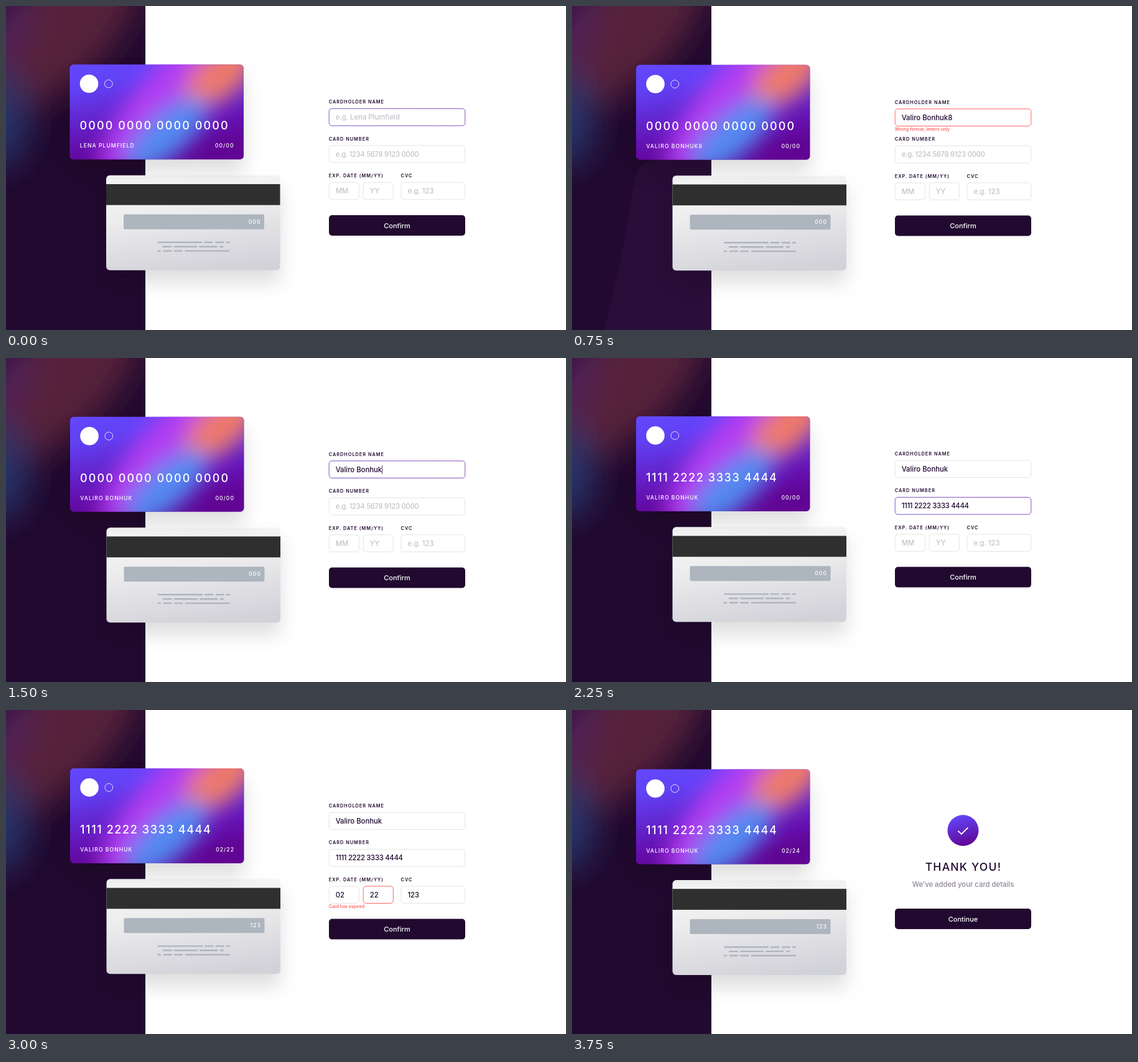
An HTML page that plays this animation: 900 by 522 pixels, repeating every 4500 ms.

```html
<!DOCTYPE html>
<html lang="en">
<head>
<meta charset="utf-8">
<title>Card details form</title>
<style>
  html, body { margin: 0; width: 100%; height: 100%; overflow: hidden; background: #fff; }
  svg { display: block; width: 900px; height: 522px; }
  text { font-family: Inter, "Open Sans", sans-serif; font-size: 11.3px; font-weight: 500; fill: #21092f; }
  .label { font-size: 7.3px; font-weight: 600; letter-spacing: 1.02px; }
  .error { font-size: 7.1px; fill: #ff5050; }
  .button { font-size: 11px; fill: #fff; }
  .card text { fill: #fff; font-size: 8.6px; letter-spacing: 1.05px; }
  .card .number { font-size: 18px; }
  .digits { letter-spacing: -.3px; }
  .middle { text-anchor: middle; }
  .end { text-anchor: end; }
  .shadow { filter: drop-shadow(0 20px 15px rgba(0, 0, 0, .13)); }
  .field { fill: #fff; }
</style>
</head>
<body>
<svg viewBox="0 0 900 522">
  <defs>
    <linearGradient id="violet" x1=".3" y1="0" x2=".55" y2="1">
      <stop stop-color="#6348fe"/><stop offset="1" stop-color="#610595"/>
    </linearGradient>
    <linearGradient id="front" x1="0" y1="0" x2=".3" y2="1">
      <stop stop-color="#6348fe"/><stop offset=".25" stop-color="#6141f4"/>
      <stop offset=".8" stop-color="#6410b0"/><stop offset="1" stop-color="#610595"/>
    </linearGradient>
    <linearGradient id="back" x1=".35" y1="0" x2=".6" y2="1">
      <stop stop-color="#f7f7f7"/><stop offset=".4" stop-color="#ececed"/><stop offset="1" stop-color="#d2d2d9"/>
    </linearGradient>
    <linearGradient id="focus" gradientUnits="userSpaceOnUse" x1="519" x2="738">
      <stop stop-color="#7656cf"/><stop offset="1" stop-color="#8c4bbd"/>
    </linearGradient>
    <filter id="soft" x="-60%" y="-60%" width="220%" height="220%"><feGaussianBlur stdDeviation="17"/></filter>
    <filter id="wide" x="-60%" y="-60%" width="220%" height="220%"><feGaussianBlur stdDeviation="26"/></filter>
    <clipPath id="panelClip"><rect width="224" height="522"/></clipPath>
    <clipPath id="frontClip"><rect x="103" y="94.3" width="279.5" height="153" rx="6"/></clipPath>
    <clipPath id="backClip"><rect x="161.5" y="272.7" width="279.5" height="153" rx="6"/></clipPath>
  </defs>

  <g clip-path="url(#panelClip)">
    <rect width="224" height="522" fill="#21092f"/>
    <path id="tint" d="M52 522L78 410L103 270Q112 247 140 247H224V522Z" fill="#2a0d38"/>
    <g filter="url(#wide)">
      <ellipse cx="70" cy="50" rx="170" ry="82" transform="rotate(-40 70 50)" fill="#57213a"/>
      <ellipse cx="0" cy="45" rx="30" ry="75" transform="rotate(25 0 45)" fill="#52205a"/>
      <ellipse cx="-8" cy="182" rx="42" ry="78" fill="#28346a"/>
    </g>
  </g>

  <g id="cards">
    <g class="card">
      <rect class="shadow" x="161.5" y="272.7" width="279.5" height="153" rx="6" fill="url(#back)"/>
      <rect class="shadow" x="103" y="94.3" width="279.5" height="153" rx="6" fill="url(#front)"/>
      <g clip-path="url(#backClip)">
        <rect x="161" y="287" width="281" height="33.7" fill="#2f2f2f"/>
      </g>
      <rect x="189.5" y="335.7" width="226" height="24" rx="2" fill="#adb5be"/>
      <path id="print" fill="none" stroke="#b0b4c0" stroke-width="2.4"/>
      <g clip-path="url(#frontClip)">
        <g filter="url(#soft)">
          <ellipse cx="238" cy="160" rx="135" ry="38" transform="rotate(-52 238 160)" fill="#b23cf2"/>
          <ellipse cx="345" cy="110" rx="72" ry="36" transform="rotate(-42 345 110)" fill="#ee796a"/>
          <ellipse cx="258" cy="207" rx="84" ry="34" transform="rotate(-42 258 207)" fill="#5389f0"/>
        </g>
      </g>
      <circle cx="134" cy="125.3" r="14.8" fill="#fff"/>
      <circle cx="165.3" cy="125.3" r="6.4" fill="none" stroke="#fff" stroke-width=".8"/>
      <text id="cardNumber" class="number" x="119" y="199"></text>
      <text id="cardName" x="119.3" y="228.4"></text>
      <text id="cardDate" class="end" x="367" y="228.4"></text>
      <text id="cardCvc" class="end" x="410" y="350.7"></text>
    </g>
  </g>

  <g id="form">
    <text class="label" x="518.7" y="157.2">CARDHOLDER NAME</text>
    <text class="label" x="518.7" y="216.6">CARD NUMBER</text>
    <text class="label" x="518.7" y="276">EXP. DATE (MM/YY)</text>
    <text class="label" x="634.5" y="276">CVC</text>
    <g id="fields"></g>
    <path id="caret" stroke="#21092f" stroke-width=".8"/>
    <text id="nameError" class="error" x="518.7" y="200.8">Wrong format, letters only</text>
    <text id="dateError" class="error" x="518.7" y="319.5">Card has expired</text>
    <rect x="519" y="337" width="219" height="33" rx="5" fill="#21092f"/>
    <text class="button middle" x="628.5" y="357.7">Confirm</text>
  </g>

  <g id="thanks">
    <circle cx="628.5" cy="194" r="25" fill="url(#violet)"/>
    <path d="M620.5 194.7L625.8 200L636.5 189.3" fill="none" stroke="#fff" stroke-width="1.8"/>
    <text class="middle" x="629" y="259" style="font-size:17.6px;letter-spacing:1.2px">THANK YOU!</text>
    <text class="middle" x="628.5" y="285.4" style="fill:#8f8694">We’ve added your card details</text>
    <rect x="519" y="320" width="219" height="33" rx="5" fill="#21092f"/>
    <text class="button middle" x="628.5" y="340.7">Continue</text>
  </g>
</svg>
<script>
const STEP = 750;
const $ = id => document.getElementById(id);
const show = (id, on) => $(id).setAttribute('visibility', on ? 'visible' : 'hidden');
const move = (id, x, y) => $(id).setAttribute('transform', `translate(${x} ${y})`);

// [x, y, width, placeholder]
const layout = {
  name: [519, 165, 219, 'e.g. Lena Plumfield'],
  number: [519, 224.5, 219, 'e.g. 1234 5678 9123 0000'],
  month: [519, 284, 48.5, 'MM'],
  year: [574, 284, 48.5, 'YY'],
  cvc: [634.7, 284, 103.3, 'e.g. 123']
};

const person = 'Valiro Bonhuk';
const number = '1111 2222 3333 4444';
const filled = { name: person, number, month: '02', cvc: '123' };
const states = [
  { focus: 'name', x: -.5, y: 0 },
  { name: person + '8', error: 'name', y: .5 },
  { name: person, focus: 'name', caret: true, y: .5 },
  { name: person, number, focus: 'number', y: -.4 },
  { ...filled, year: '22', error: 'year', y: -.4 },
  { ...filled, year: '24', done: true, y: 1.2 }
];

// Printed lines on the back: start and end of each dash
const rows = [
  [244, 316, 319, 333, 337, 351, 354, 360],
  [252, 267, 270, 308, 311, 340, 344, 350],
  [244, 249, 253, 267, 270, 284, 288, 360]
];
$('print').setAttribute('d', rows.map((row, r) =>
  row.map((x, i) => (i % 2 ? 'H' + x : `M${x} ${380.8 + r * 6.9}`)).join('')).join(''));

$('fields').innerHTML = Object.entries(layout).map(([key, [x, y, width]]) =>
  `<rect id="${key}Box" class="field" x="${x + .2}" y="${y + .3}" width="${width - .4}" height="27.6" rx="4.5"/>
   <text id="${key}" class="${key === 'number' ? 'digits' : ''}" x="${x + 10.7}" y="${y + 18.3}"></text>`).join('');

function draw(state) {
  const { x = 0, y } = state;
  move('cards', x, y);
  move('form', 0, y);
  show('form', !state.done);
  show('thanks', state.done);
  show('tint', state === states[1]);

  for (const key in layout) {
    const text = $(key), box = $(key + 'Box');
    text.textContent = state[key] || layout[key][3];
    text.style.fill = state[key] ? '#21092f' : '#c5c2c9';
    box.setAttribute('stroke', state.error === key ? '#ff6464' : state.focus === key ? 'url(#focus)' : '#dfdee0');
    box.setAttribute('stroke-width', state.error === key || state.focus === key ? 1 : .8);
  }
  $('cardNumber').textContent = state.number || '0000 0000 0000 0000';
  $('cardNumber').style.letterSpacing = state.number ? '1.6px' : '2.1px';
  $('cardName').textContent = (state.name || 'Lena Plumfield').toUpperCase();
  $('cardDate').textContent = `${state.month || '00'}/${state.year || '00'}`;
  $('cardCvc').textContent = state.cvc || '000';

  show('caret', state.caret);
  const end = 530.2 + $('name').getComputedTextLength();
  $('caret').setAttribute('d', `M${end} 172.5V186.5`);
  show('nameError', state.error === 'name');
  show('dateError', state.error === 'year');
}

let current;
function tick(now) {
  const state = states[Math.floor(now / STEP) % states.length];
  if (state !== current) draw(current = state);
  requestAnimationFrame(tick);
}
draw(current = states[0]);
const start = performance.now();
requestAnimationFrame(function run() {
  tick = (() => {
    const state = states[Math.floor((performance.now() - start) / STEP) % states.length];
    if (state !== current) draw(current = state);
    requestAnimationFrame(tick);
  });
  tick();
});
</script>
</body>
</html>
```
